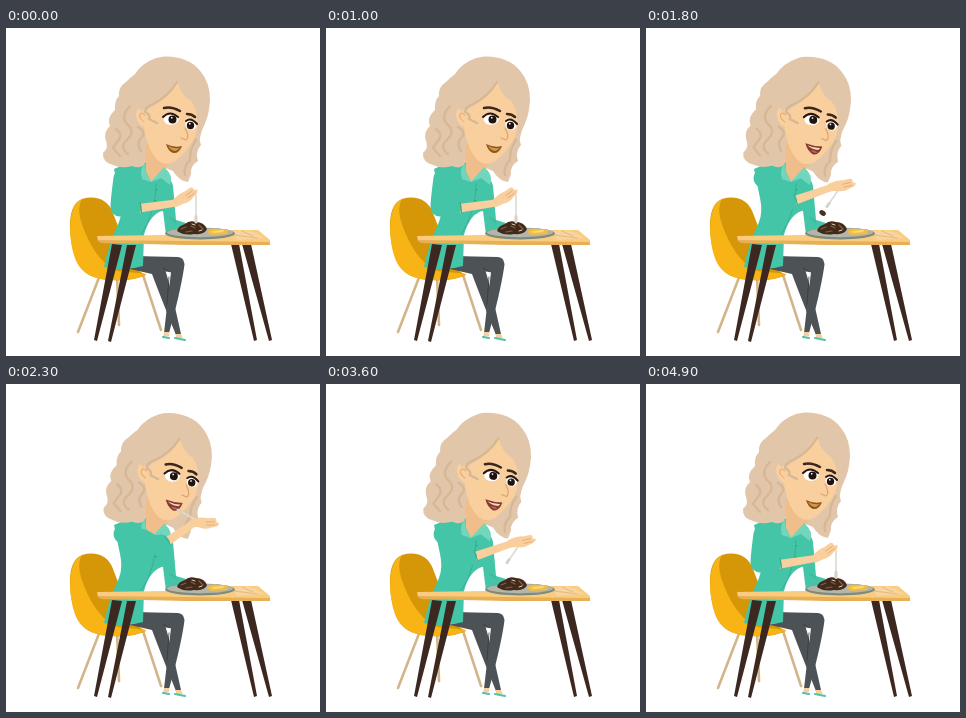
Recreate the animation shown at these times as an HTML page. Size 314 by 328 pixels, loop 5000 ms.

```html
<!DOCTYPE html>
<html lang="en">
<head>
<meta charset="utf-8">
<title>Woman eating at a table</title>
<style>
  html, body { margin: 0; width: 100%; height: 100%; overflow: hidden; background: #fff; }
  svg { display: block; width: 100%; height: 100%; }
  .line { fill: none; stroke-linecap: round; stroke-linejoin: round; }
  .shirt { fill: #45c5a8; }
  .skin { fill: #f9cf9d; }
  .hair { fill: #e2c6aa; }
  .wave { stroke: #d7b895; stroke-width: 2.4; }
  .fold { stroke: #35aa8f; stroke-width: .8; }
  .wood { fill: #3d2821; }
  .pants { fill: #4d5256; }
</style>
</head>
<body>
<svg viewBox="0 0 314 328" preserveAspectRatio="none">
  <g id="chair">
    <path class="line" stroke="#d3b58b" stroke-width="2.6" d="M94 247L72 304M111 248L113 297M137 247L155 302"/>
    <path fill="#d59708" d="M76 171C89 167 102 171 107 185L128 240L140 247Q126 254 104 252C84 251 72 242 68 225C63 207 60 177 76 171Z"/>
    <path fill="#f8b414" d="M76 171C62 177 62 207 68 227C73 245 87 252 106 252Q129 253 141 246L112 243C94 236 84 217 77 199Q70 181 76 171Z"/>
  </g>

  <g id="legs">
    <path class="pants" d="M124 229Q150 226 158 238Q164 256 175 306L170 307Q155 270 146 246L124 241Z"/>
    <path class="pants" d="M126 228L172 229Q180 230 178 240Q174 266 163 305L158 305Q162 270 165 244L130 241Z"/>
    <path class="line" stroke="#383c42" stroke-width=".8" d="M164 244L157 240M163 249L161 276"/>
    <path class="skin" d="M158 304L163 304L163 308L157 309ZM170 306L175 306L177 310L170 311Z"/>
    <path class="line" stroke="#4fc1a8" stroke-width="2" d="M157 309L163 310M169 310L179 312"/>
  </g>

  <g id="body">
    <path class="shirt" d="M148 143Q164 145 167 158L170 192L180 195L183 207L160 207L157 183L148 180Z"/>
    <path class="shirt" d="M108 141Q124 133 140 134L160 143L166 156L160 182Q144 184 138 207L137 238Q118 244 98 239Q103 215 113 194Q117 184 114 170Z"/>
    <path class="line fold" d="M150 156Q150 184 135 207M125 218L119 239M170 194L164 190"/>
    <path fill="#2f9b82" d="M150 161h1.3v1.3h-1.3zM149 172h1.3v1.3h-1.3z"/>
  </g>

  <g id="head">
    <path class="hair" d="M150 30C162 26 185 29 195 44Q204 55 204 72C203 86 201 92 196 102Q192 109 195 117Q189 124 192 133Q184 138 185 146L182 154Q173 153 167 143L140 132L138 137Q133 141 126 138Q115 141 107 137Q96 134 97 125Q103 120 100 113Q97 104 104 98Q100 90 109 82Q108 73 113 68Q112 59 120 54Q125 49 129 46Q136 35 150 30Z"/>
    <path fill="#efbe8a" d="M139 114L140 144L145 154L159 143L164 131Z"/>
    <path fill="#72d6bd" d="M139 135Q133 141 136 151L145 154L140 145ZM158 139L145 154L155 150L164 157Q168 147 158 139Z"/>
    <path class="skin" d="M171 55Q163 68 149 77Q138 82 137 93Q138 103 141 113Q146 130 156 135Q165 138 173 130Q188 116 193 99Q196 78 171 55Z"/>
    <path class="skin" d="M141 83Q130 75 130 87Q131 98 141 100Z"/>
    <path class="line" stroke="#e1a771" d="M139 87Q133 82 134 90L138 94"/>
    <path class="hair" d="M172 50Q172 65 185 73Q193 83 191 101L187 119L194 110L196 101Q203 88 203 72L196 46Z"/>
    <path class="hair" d="M171 55Q161 70 145 76Q138 79 136 84Q129 72 129 88L133 99Q139 101 136 108Q142 117 137 125L133 133L115 130L112 98L127 63L147 46Z"/>
    <path class="line wave" d="M171 54Q162 69 147 76Q139 79 139 84Q145 87 143 91L151 95M132 99Q141 104 135 110Q130 116 135 123M124 78Q114 88 121 96Q130 103 121 112Q113 119 122 126M110 101Q118 107 111 114L107 120L114 128M190 112Q183 122 184 132Q177 139 179 147"/>
    <path class="line" stroke="#3a2820" stroke-width="2.5" d="M158 80Q165 78 174 83M181 86Q186 86 189 89"/>
    <ellipse cx="165" cy="91" rx="7.500" ry="6" fill="#fff"/>
    <ellipse cx="185" cy="96.500" rx="5.500" ry="5.500" fill="#fff"/>
    <circle cx="166.500" cy="91.500" r="4" fill="#20130f"/>
    <circle cx="184.500" cy="97.500" r="3.700" fill="#20130f"/>
    <path class="line" stroke="#28170f" stroke-width="2" d="M157 89Q164 82 172 89M180 93Q185 89 191 96"/>
    <path fill="#fff" d="M165 89h1.500v1.500h-1.500zM183 95h1.500v1.500h-1.500z"/>
    <path class="line" stroke="#dea36f" stroke-width="1.200" d="M179 100Q184 109 180 112L175 110"/>
    <g id="smile">
      <path fill="#8e5424" d="M160 116Q168 120 176 118Q173 126 167 125Q162 123 160 116Z"/>
      <path fill="#cf9b40" d="M162 118Q168 121 174 120L170 123Q165 123 162 118Z"/>
    </g>
    <g id="open">
      <path fill="#87392b" d="M159 115Q167 118 176 118Q173 127 167 126Q161 123 159 115Z"/>
      <path fill="#eadbcb" d="M161 117Q168 120 174 119.500L172 121.500Q165 121 161 117Z"/>
      <path fill="#b9695a" d="M164 122Q169 122 171 124Q168 126 164 122Z"/>
    </g>
  </g>

  <g id="table">
    <path class="wood" d="M106 216L116 217L91 313L88 312ZM121 217L130 217L105 314L102 313ZM225 216L233 216L251 312L248 313ZM236 216L245 216L266 312L263 313Z"/>
    <path fill="#f9cc7f" d="M91 208L158 207L228 202L252 202L264 212L264 215L92 213Z"/>
    <path fill="#e8b055" d="M91 212L264 214L264 217L180 217L95 215Z"/>
    <path fill="#f7d5a3" d="M226 204Q238 200 250 205L258 210L231 212Z"/>
    <path class="line" stroke="#e6af66" stroke-width=".8" d="M228 207L251 210M236 203L247 208"/>
    <ellipse cx="194" cy="205.500" rx="35" ry="6" fill="#7f8a80"/>
    <ellipse cx="194" cy="204.500" rx="33" ry="4.700" fill="#b3b6a8"/>
    <path fill="#f2bd42" d="M201 204Q205 199 212 201L222 201L221 206L205 207Z"/>
    <path fill="#ffd96e" d="M206 203L218 202L217 204L207 205Z"/>
    <path fill="#42291b" d="M171 203Q172 198 179 196Q183 192 190 194Q198 194 201 201Q199 207 188 206Q178 208 171 203Z"/>
    <path class="line" stroke="#85613c" stroke-width="1.200" d="M175 201L180 199M185 198L189 200M193 197L197 201M180 204L186 203"/>
    <path class="line" stroke="#e6d2b2" d="M186 196L189 197M193 203L196 202"/>
  </g>

  <g id="arm">
    <path id="forearm" class="skin"/>
    <path id="sleeve" class="line" stroke="#45c5a8" stroke-width="19"/>
    <path id="cuff" class="line" stroke="#35aa8f"/>
    <path id="fork" class="line" stroke="#dddcd2" stroke-width="1.700"/>
    <path id="tines" class="line" stroke="#d3d3ca" stroke-width="3"/>
    <ellipse id="bite" rx="3.500" ry="2.500" fill="#4a3020"/>
    <g id="hand">
      <path class="skin" d="M-3 -3.500Q6 -7 13 -6L20 -7Q23 -6 22 -3L25 -2Q25 1 21 2L18 3Q12 6 6 4L-3 3.500Z"/>
      <path class="line" stroke="#dfa875" stroke-width=".8" d="M12 -2L20 -3M13 1L21 0"/>
    </g>
  </g>
</svg>
<script>
  const LOOP = 5000, STEP = 100;
  const $ = id => document.getElementById(id);

  // elbow, cuff, wrist, hand angle, fork top, fork tip, head lean
  const down = [114, 181, 135, 180, 170, 175, -28, 190, 167, 190, 194, 0];
  const half = [132, 173, 150, 172, 185, 160, -6, 192, 163, 181, 179, .8];
  const high = [145, 163, 162, 157, 188, 139, 5, 190, 136, 172, 126, 1.5];

  // 0 to 1 with soft ends, over one second from start
  function ramp(t, start) {
    const u = Math.min(1, Math.max(0, (t - start) / 1000));
    return u * u * (3 - 2 * u);
  }

  // One smooth sweep: a parabola through the three poses.
  function poseAt(u) {
    const a = (1 - u) * (1 - 2 * u), b = 4 * u * (1 - u), c = u * (2 * u - 1);
    return down.map((v, n) => a * v + b * half[n] + c * high[n]);
  }

  function show(id, on) { $(id).style.display = on ? '' : 'none'; }

  function draw(t) {
    const rise = ramp(t, 1300) - ramp(t, 3100);
    let [ex, ey, cx, cy, wx, wy, turn, fx, fy, tx, ty, lean] = poseAt(rise);
    const jab = (1 - rise) * Math.sin(t * Math.PI / 500);
    wy += jab; fy += jab; ty += jab;

    const len = Math.hypot(wx - cx, wy - cy);
    const dx = (wx - cx) / len, dy = (wy - cy) / len;
    const side = (x, y, w) => `${x - dy * w} ${y + dx * w}`;
    const bx = cx - dx * 6, by = cy - dy * 6;
    $('forearm').setAttribute('d',
      `M${side(bx, by, -4.5)}L${side(wx, wy, -3.5)}L${side(wx, wy, 3.5)}L${side(bx, by, 4.5)}Z`);

    // The sleeve stops short of the cuff so its round cap ends there.
    const sx = cx - dx * 9, sy = cy - dy * 9;
    $('sleeve').setAttribute('d', `M117 150Q${ex} ${ey - 8} ${ex} ${ey - 2}L${sx} ${sy - 2}`);
    $('cuff').setAttribute('d', `M${side(cx, cy, -6)}L${side(cx, cy, 5)}`);

    const along = k => `${tx + (fx - tx) * k} ${ty + (fy - ty) * k}`;
    $('fork').setAttribute('d', `M${fx} ${fy}L${tx} ${ty}`);
    $('tines').setAttribute('d', `M${along(.2)}L${along(0)}`);
    $('bite').setAttribute('transform', `translate(${along(-.4)}) rotate(35)`);
    show('bite', t >= 1400 && t < 2200);
    $('hand').setAttribute('transform', `translate(${wx} ${wy}) rotate(${turn})`);

    $('head').setAttribute('transform', `rotate(${lean} 140 145)`);
    const open = t >= 1500 && t < 4000;
    show('open', open);
    show('smile', !open);
  }

  function tick(now) {
    draw(Math.floor(now % LOOP / STEP) * STEP);
    requestAnimationFrame(tick);
  }
  draw(0);
  requestAnimationFrame(tick);
</script>
</body>
</html>
```
